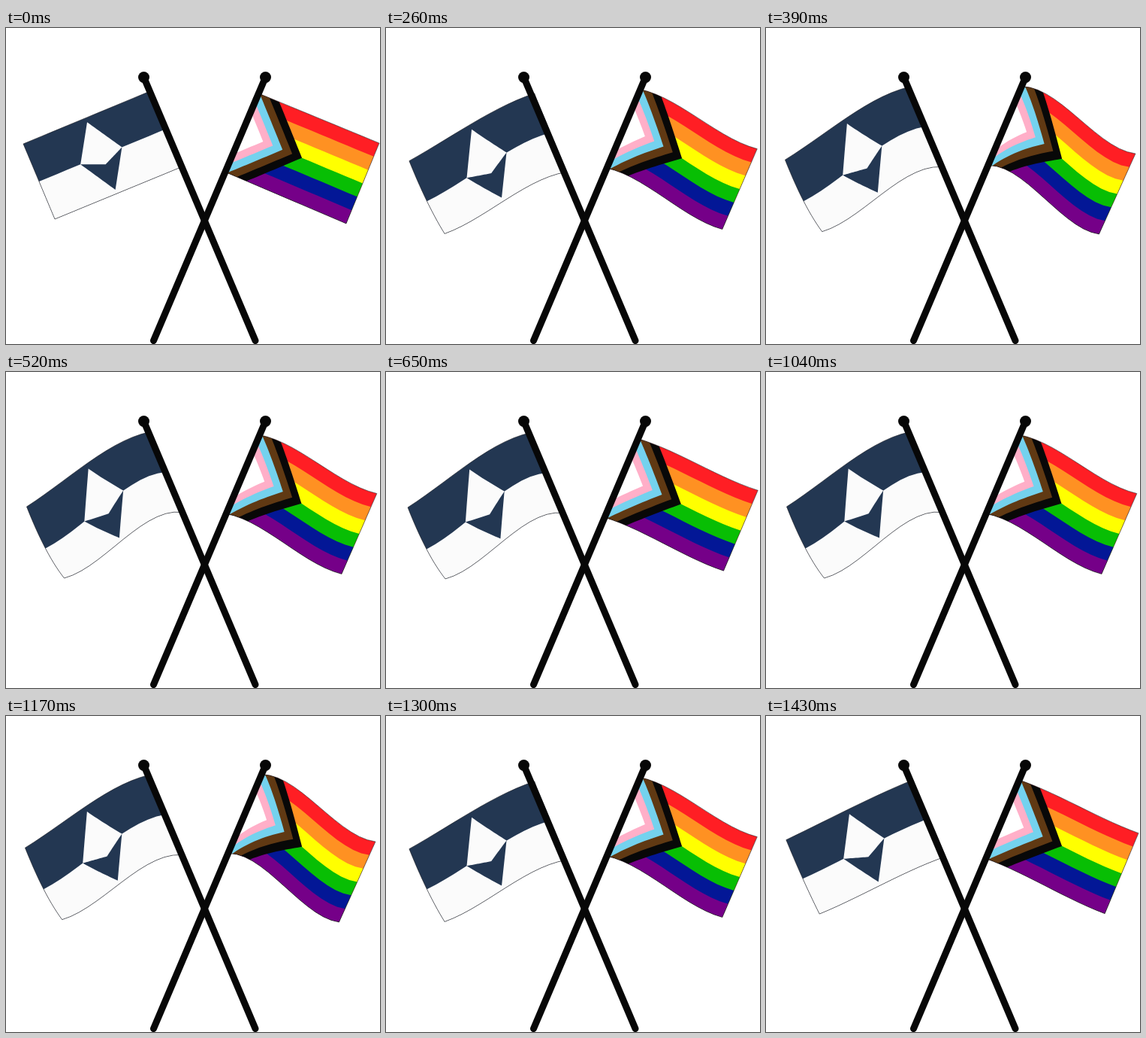
An HTML page with a canvas that plays this animation: 498 px wide and 420 px high, repeating every 1.56 s.

```html
<!DOCTYPE html>
<html lang="en">
<head>
<meta charset="utf-8">
<title>Crossed flags</title>
<style>
  html, body { margin: 0; width: 100%; height: 100%; overflow: hidden; background: #fff; }
  canvas { display: block; }
</style>
</head>
<body>
<canvas id="stage" width="498" height="420"></canvas>
<script>
const ctx = document.getElementById('stage').getContext('2d');
const STEP = 130, LAST = 6; // poses 0..LAST, played there and back
const EDGE = -0.04; // cloth tucked behind the pole
const NAVY = '#233752', CLOTH = '#fbfbfb', POLE = '#070707', HEM = 'rgba(15,15,20,.7)';

const stripes = ['#ff1e24', '#ff9122', '#ffff00', '#08be04', '#031796', '#750088'];
const chevrons = ['#080808', '#603913', '#74d2ee', '#ffafc8', '#ffffff'];

// Key poses of the right flag
const rest = { hx: 339, hy: 88, fx: 497, fy: 153, lean: 44, bend: 0 };
const full = { hx: 346, hy: 78, fx: 492, fy: 167, lean: 48.5, bend: 24 };
const settled = { hx: 337.5, hy: 92.5, fx: 496, fy: 155, lean: 45, bend: 2 };

const mix = (a, b, t) => a + (b - a) * t;
const mean = (a, b) => a.map((n, i) => (n + b[i]) / 2);
const blend = (a, b, t) =>
  Object.fromEntries(Object.keys(a).map(key => [key, mix(a[key], b[key], t)]));

// One lengthwise thread of cloth: [x0, y0, x1, y1, bend near hoist, bend near fly]
function thread([x0, y0, x1, y1, d1, d2], u) {
  const w = 1 - u;
  return [mix(x0, x1, u), mix(y0, y1, u) + 3 * u * w * (w * d1 + u * d2)];
}

// Cloth surface (u, v) -> (x, y), quadratic across three threads
function surface(top, low, sag = 0) {
  const mid = mean(top, low);
  mid[3] += sag;
  return (u, v) => {
    const a = thread(top, u), b = thread(mid, u), c = thread(low, u);
    const p = (1 - v) * (1 - 2 * v), q = 4 * v * (1 - v), r = v * (2 * v - 1);
    return [0, 1].map(i => p * a[i] + q * b[i] + r * c[i]);
  };
}

function trace(map, points) {
  const n = 14;
  ctx.beginPath();
  points.forEach(([u, v], i) => {
    const [u2, v2] = points[(i + 1) % points.length];
    for (let s = 0; s < n; s++) ctx.lineTo(...map(mix(u, u2, s / n), mix(v, v2, s / n)));
  });
  ctx.closePath();
}

function patch(map, color, points) {
  trace(map, points);
  ctx.fillStyle = color;
  ctx.fill();
}

const band = (v0, v1) => [[EDGE, v0], [1, v0], [1, v1], [EDGE, v1]];

function outline(map) {
  trace(map, band(0, 1));
  ctx.lineWidth = 0.8;
  ctx.strokeStyle = HEM;
  ctx.stroke();
}

function leftFlag(k) {
  // the fly end sinks and the cloth curls, while the hoist slips down and snaps back
  const sway = Math.sin(Math.PI / 2 * Math.min(k / 4, 1)) ** 1.25;
  const curl = sway ** 1.5;
  const slip = k < 3 ? 2 * k : 1.5 * (k - 5);
  const hx = 187 + slip, hy = 86 + 1.2 * slip - 0.8 * k;
  const fx = hx - 164 + 6 * sway, fy = hy + 68 + 30 * sway;
  const map = surface(
    [hx, hy, fx, fy, -19 * curl, -curl],
    [hx + 43.5, hy + 100 + 5 * sway, fx + 42 + 8 * sway, fy + 100 - 5 * sway, -30 * curl, 16 * curl],
    8 * sway
  );
  const east = [0.33, 0.5], west = [0.665, 0.5], notch = [0.492, 0.617];
  patch(map, NAVY, band(0, 1));
  patch(map, CLOTH, band(0.5, 1));
  patch(map, CLOTH, [[0.496, 0.055], east, notch, west]);
  patch(map, NAVY, [east, [0.5, 0.95], west, notch]);
  outline(map);
}

function rightFlag(k) {
  const swell = (1 - Math.abs(k - 3) / 3) ** 1.5;
  const { hx, hy, fx, fy, lean, bend } = blend(k < 3 ? rest : settled, full, swell);
  const map = surface(
    [hx, hy, fx, fy, -bend, bend],
    [hx - 43.5, hy + 105, fx - lean, fy + 107, -bend, bend]
  );
  ctx.save();
  trace(map, band(0, 1));
  ctx.clip();
  // each stripe runs to the hem so no seams show
  stripes.forEach((color, i) => patch(map, color, band(i / 6, 1)));
  chevrons.forEach((color, i) => {
    const tip = 0.487 - 0.082 * i, u = tip - 0.33;
    patch(map, color, [[EDGE, 0], [u, 0], [tip, 0.5], [u, 1], [EDGE, 1]]);
  });
  ctx.restore();
  outline(map);
}

function pole(x0, y0, x1, y1) {
  ctx.strokeStyle = ctx.fillStyle = POLE;
  ctx.lineWidth = 9;
  ctx.lineCap = 'round';
  ctx.beginPath();
  ctx.moveTo(x0, y0);
  ctx.lineTo(x1, y1);
  ctx.stroke();
  ctx.beginPath();
  ctx.arc(x0, y0, 7.5, 0, 2 * Math.PI);
  ctx.fill();
}

function draw(now) {
  const i = Math.floor(now / STEP) % (2 * LAST);
  const k = Math.min(i, 2 * LAST - i);
  ctx.fillStyle = '#fff';
  ctx.fillRect(0, 0, 498, 420);
  leftFlag(k);
  rightFlag(k);
  pole(183.5, 65.5, 332, 415.5);
  pole(345.5, 65.5, 196.5, 415.5);
}

const start = performance.now();
function tick() {
  draw(performance.now() - start);
  requestAnimationFrame(tick);
}
tick();
</script>
</body>
</html>
```
